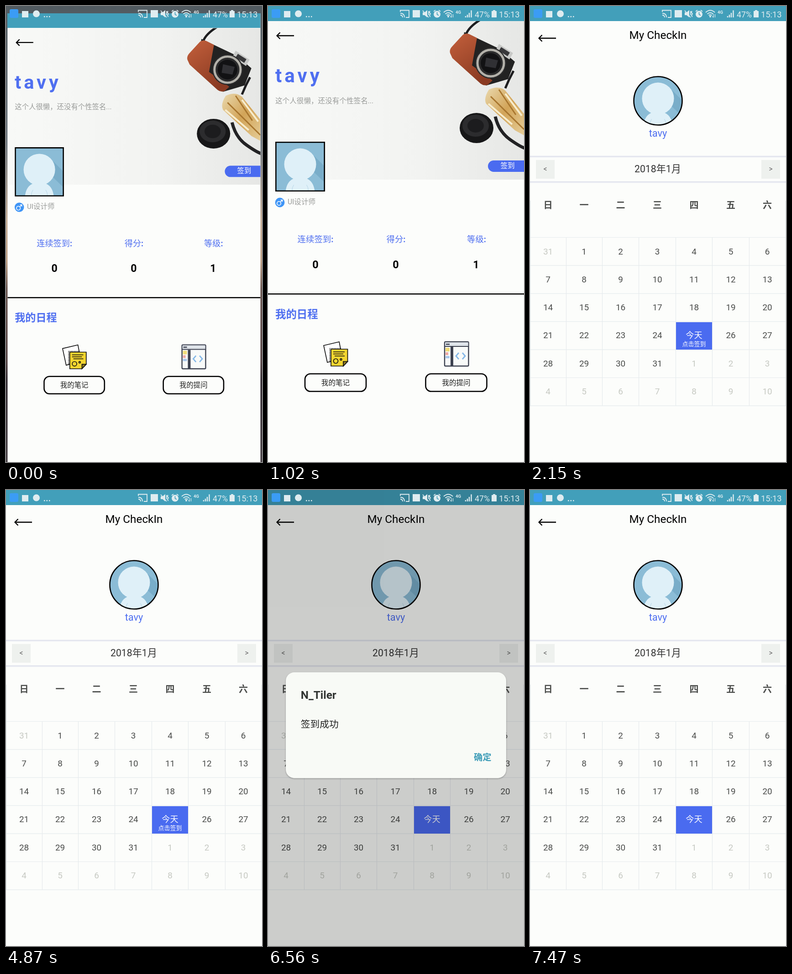
Recreate the animation shown at these times as an HTML page. Size 561 by 998 pixels, loop 8 s.

```html
<!DOCTYPE html>
<html lang="zh-CN">
<head>
<meta charset="utf-8">
<title>Check-in</title>
<style>
  html, body { margin: 0; width: 100%; height: 100%; overflow: hidden; background: #fcfdfb; }
  svg { display: block; width: 100%; height: 100%; }
  text { font-family: Roboto, "Noto Sans CJK SC", "Noto Sans CJK", sans-serif; }
  .mid { text-anchor: middle; }
  .bold { font-weight: 700; }
  .blue { fill: #4f6ff0; }
  .grey { fill: #999b99; }
  .s16 { font-size: 15.6px; }
  .s18 { font-size: 18.4px; }
  .s23 { font-size: 23.4px; }
  .line { fill: none; stroke: #000; stroke-width: 2.6; }
  .icon { fill: none; stroke: #dfecf0; stroke-width: 1.8; }
  .fillIcon { fill: #dfecf0; }
  .grid { fill: none; stroke: #e6ebed; stroke-width: 1.2; }

  #window, #checkin, #dim, #dialog, #hint { animation: 8s step-end infinite; }
  #window { animation-name: launch; transform-origin: 280.5px 499px; }
  #checkin { animation-name: enter; }
  #dim { animation-name: dim; }
  #dialog { animation-name: popup; transform-origin: 280.5px 515px; }
  #hint { animation-name: hint; }

  @keyframes launch {
    0% { transform: translateY(9.6px) scale(.9876); }
    1.37% { transform: translateY(5px) scale(.9935); }
    2.8% { transform: translateY(2.4px) scale(.997); }
    4.2% { transform: translateY(1px) scale(.9987); }
    5.6% { transform: translateY(.3px) scale(.9996); }
    7%, 100% { transform: none; }
  }
  @keyframes enter {
    0% { opacity: 0; transform: translateY(50px); }
    14.1% { opacity: .25; transform: translateY(30px); }
    15.5% { opacity: .6; transform: translateY(13px); }
    17% { opacity: .85; transform: translateY(4px); }
    18.35% { opacity: .96; transform: translateY(1px); }
    19.75%, 100% { opacity: 1; transform: none; }
  }
  @keyframes dim {
    0% { opacity: 0; }
    63.65% { opacity: .03; }
    65.05% { opacity: .09; }
    66.45% { opacity: .155; }
    67.85% { opacity: .205; }
    69.3% { opacity: .235; }
    70.75% { opacity: .25; }
    81.95% { opacity: .19; }
    83.5% { opacity: .12; }
    84.9% { opacity: .06; }
    86.3% { opacity: .02; }
    87.7%, 100% { opacity: 0; }
  }
  @keyframes popup {
    0% { opacity: 0; }
    65.05% { opacity: .6; transform: scale(.96); }
    66.45% { opacity: 1; transform: none; }
    81.95% { opacity: 1; transform: scale(.9915); }
    83.5% { opacity: .55; transform: scale(.965); }
    84.9% { opacity: .15; transform: scale(.94); }
    86.3%, 100% { opacity: 0; transform: none; }
  }
  @keyframes hint {
    0% { opacity: 1; }
    72.1%, 100% { opacity: 0; }
  }
</style>
</head>
<body>
<svg viewBox="0 0 561 998" preserveAspectRatio="none">
  <defs>
    <linearGradient id="wall" x2="0" y2="1">
      <stop offset="0" stop-color="#515a60"/>
      <stop offset=".3" stop-color="#727a82"/>
      <stop offset=".47" stop-color="#c9b29c"/>
      <stop offset=".56" stop-color="#c0a288"/>
      <stop offset=".62" stop-color="#6e5a55"/>
      <stop offset=".78" stop-color="#564546"/>
      <stop offset=".82" stop-color="#332c33"/>
      <stop offset="1" stop-color="#4a4348"/>
    </linearGradient>
    <linearGradient id="desk">
      <stop offset="0" stop-color="#f8f9f7"/>
      <stop offset=".6" stop-color="#f2f3f1"/>
      <stop offset="1" stop-color="#e6e7e5"/>
    </linearGradient>
    <linearGradient id="leather" x2=".6" y2="1">
      <stop offset="0" stop-color="#c4603c"/>
      <stop offset="1" stop-color="#8a3a22"/>
    </linearGradient>
    <linearGradient id="glass" x2="1" y2="1">
      <stop offset="0" stop-color="#ead9ae"/>
      <stop offset=".5" stop-color="#d2a458"/>
      <stop offset="1" stop-color="#e5cd98"/>
    </linearGradient>
    <filter id="shadow" x="-5%" y="-5%" width="110%" height="112%">
      <feDropShadow dx="0" dy="1.5" stdDeviation="1.5" flood-opacity=".3"/>
    </filter>
    <filter id="soft"><feGaussianBlur stdDeviation=".7"/></filter>
    <clipPath id="photoClip"><path d="M0 33H561V380H0Z"/></clipPath>
    <clipPath id="round"><circle r="53"/></clipPath>
    <pattern id="dots" width="2.4" height="2.4" patternUnits="userSpaceOnUse">
      <circle cx="1.2" cy="1.2" r=".8"/>
    </pattern>
    <g id="face">
      <path fill="#8bbcd6" d="M-53-53H53V53H-53Z"/>
      <path fill="#79adc9" d="M30-24 53-1V34L30 12Z"/>
      <path fill="#dff0f8" d="M-32 54Q-29 30-11 25H11Q29 30 32 54Z"/>
      <circle cy="-5" r="35" fill="#dff0f8"/>
      <path fill="none" stroke="#b5d5e5" d="M-18 54Q-18 45-14 40M18 54Q18 45 14 40"/>
    </g>
    <path id="back" fill="none" stroke="#000" stroke-width="2.3" d="M57 0H19M26.500-7 19.500 0 26.500 7"/>
  </defs>

  <path fill="url(#wall)" d="M0 0H561V998H0Z"/>

  <g id="window">
    <path fill="#fcfdfb" d="M0 0H561V998H0Z"/>

    <g id="profile">
      <g clip-path="url(#photoClip)">
        <path fill="url(#desk)" d="M0 33H561V380H0Z"/>
        <g filter="url(#soft)">
          <path fill="none" stroke="#1d1d1f" stroke-width="5" d="M434 62Q440 46 464 31M520 180Q528 160 538 142"/>
          <path fill="none" stroke="#222224" stroke-width="7" d="M498 242Q506 275 530 292T565 312"/>
          <path fill="#222" d="M430 57 510 95 541 122 526 160 478 174 420 128Z"/>
          <path fill="url(#leather)" d="M399 103Q397 95 404 88L427 63Q434 58 442 62L458 70 447 130 492 163 482 172Q474 176 466 170L404 114Z"/>
          <path fill="#c8c9c7" d="M506 83 537 103 529 117 499 97Z"/>
          <path fill="#38383a" d="M511 90 530 102 525 110 506 98Z"/>
          <circle cx="488" cy="125" r="34" fill="#2b2b2c"/>
          <circle cx="488" cy="125" r="29" fill="none" stroke="#b3b1aa" stroke-width="5"/>
          <circle cx="488" cy="125" r="22" fill="#121214"/>
          <path fill="#303034" d="M478 113 504 119 499 136 475 132Z"/>
          <path fill="url(#glass)" d="M484 183Q505 173 520 185L561 236V283L541 272 478 214Q472 202 484 183Z"/>
          <path fill="none" stroke="#a8762f" stroke-width="3" d="M488 198 561 270M506 183 543 238"/>
          <path fill="none" stroke="#f7eccc" stroke-width="4" d="M483 214 535 259M520 192 556 240"/>
          <ellipse cx="457" cy="267" rx="37" ry="33" fill="#171718"/>
          <ellipse cx="455" cy="262" rx="29" ry="24" fill="#2c2c2e"/>
          <ellipse cx="455" cy="262" rx="18" ry="15" fill="#1c1c1e"/>
        </g>
      </g>
      <use href="#back" y="65"/>
      <text class="blue bold" x="16" y="167" font-size="42" letter-spacing="6">tavy</text>
      <text class="grey s16" x="16" y="213">这个人很懒，还没有个性签名...</text>
      <path fill="#4a6bf0" d="M561 338H494.500a12.500 12.500 0 0 0 0 25H561Z"/>
      <text class="mid s16" x="525" y="355" fill="#fff">签到</text>

      <svg x="17" y="298" width="107" height="107" viewBox="-53.500 -53.500 107 107"><use href="#face"/></svg>
      <path class="line" d="M17.300 298.300H123.700V404.700H17.300Z"/>
      <circle cx="26" cy="430" r="10.400" fill="#3f95f6"/>
      <g fill="none" stroke="#fff" stroke-width="1.600">
        <circle cx="24" cy="432" r="4.300"/>
        <path d="M27 429 31.500 424.500M27.500 424.500H31.500V428.500"/>
      </g>
      <text class="grey s16" x="43" y="434">UI设计师</text>

      <g class="mid blue s18">
        <text x="104" y="517">连续签到<tspan class="bold">:</tspan></text>
        <text x="280.500" y="517">得分<tspan class="bold">:</tspan></text>
        <text x="457" y="517">等级<tspan class="bold">:</tspan></text>
      </g>
      <g class="mid bold s23">
        <text x="104" y="573.500">0</text>
        <text x="280" y="573.500">0</text>
        <text x="456" y="573.500">1</text>
      </g>
      <path class="line" d="M0 630.300H561"/>
      <text class="blue bold s23" x="16" y="683">我的日程</text>

      <g stroke="#111" stroke-width="1.700">
        <path fill="#fff" d="M122 743 156 735 163 771 130 780Z"/>
        <path stroke="none" fill="url(#dots)" d="M134 748H160V752H140V780H134Z"/>
        <path fill="#f3d52f" d="M139 751H174.500V778L165 788H138V752Z"/>
        <path fill="#8d7a22" d="M174.500 778H165V788Z"/>
        <path fill="none" stroke-width="1.500" d="M143 757H168M143 761.500H165M146 766H168"/>
        <circle cx="148.500" cy="777" r="5" fill="none"/>
        <circle cx="160" cy="773.500" r="1.800" fill="none"/>
      </g>
      <g filter="url(#soft)">
        <rect x="387" y="735" width="52.500" height="53" rx="2" fill="#f8faf9" stroke="#3c4150" stroke-width="2.400"/>
        <path fill="#dfe4ea" d="M388 736H438.500V744H388Z"/>
        <path fill="none" stroke="#3c4150" stroke-width="2" d="M387 745H439"/>
        <path fill="#3c4150" d="M400 746H406V788H400ZM390 739H398V741.500H390Z"/>
        <path fill="#f1dc7a" d="M389 748H398V756H389Z"/>
        <path fill="#eea7a3" d="M389 758H395V764H389Z"/>
        <path fill="#a9c8ec" d="M389 766H398V771H389Z"/>
        <path fill="none" stroke="#85b8e8" stroke-width="2.800" d="M418 759 412 766 418 773M426 759 432 766 426 773"/>
      </g>
      <rect class="line" x="81" y="805" width="134" height="38.500" rx="12"/>
      <rect class="line" x="345.500" y="805" width="134" height="38.500" rx="12"/>
      <g class="mid s16" fill="#222">
        <text x="148" y="829.500">我的笔记</text>
        <text x="412.500" y="829.500">我的提问</text>
      </g>
    </g>

    <g id="checkin">
      <path fill="#fcfdfb" d="M0 33H561V998H0Z"/>
      <use href="#back" y="70.500"/>
      <text class="mid" x="280.500" y="72" font-size="24.300">My CheckIn</text>
      <g transform="translate(280.500 207.500)">
        <use href="#face" clip-path="url(#round)"/>
        <circle class="line" r="53"/>
      </g>
      <text class="mid blue" x="280.500" y="285.500" font-size="21.800">tavy</text>
      <path fill="none" stroke="#f0f1f6" stroke-width="4" d="M0 329.500H561M0 385.500H561"/>
      <path fill="none" stroke="#dcdfe9" stroke-width="1.400" d="M0 329.500H561M0 385H561"/>
      <path fill="#eef1ee" d="M13 337H54V378H13ZM507 337H548V378H507Z"/>
      <g class="mid s16" fill="#666">
        <text x="33.500" y="362">&lt;</text>
        <text x="527.500" y="362">&gt;</text>
      </g>
      <text class="mid" x="280" y="364" font-size="21.200" fill="#333">2018年1月</text>
      <g id="calendar" class="mid"></g>
      <path fill="#4a6bf0" d="M320 692H399V752H320Z"/>
      <g class="mid" fill="#fff">
        <text x="359.500" y="727" font-size="18.200">今天</text>
        <text id="hint" x="359.500" y="744" font-size="13">点击签到</text>
      </g>
    </g>

    <path fill="#429fba" d="M0 0H561V33H0Z"/>
  </g>

  <path id="dim" d="M0 0H561V998H0Z"/>

  <g id="dialog">
    <rect x="37" y="398" width="487" height="233.500" rx="19" fill="#f8faf6" filter="url(#shadow)"/>
    <text class="bold" x="70" y="457" font-size="24.500" fill="#303331">N_Tiler</text>
    <text x="70" y="520.500" font-size="20.900" fill="#222">签到成功</text>
    <text class="mid bold" x="472" y="593" font-size="19.500" fill="#3f9db8">确定</text>
  </g>

  <g id="status">
    <rect x="8" y="7" width="19" height="19" rx="3" fill="#3b9cf5"/>
    <rect class="fillIcon" x="35" y="11" width="14" height="14"/>
    <circle class="fillIcon" cx="66.500" cy="17" r="7.500"/>
    <path class="fillIcon" d="M83 22h2.500v2.500H83ZM88.500 22h2.500v2.500h-2.500ZM94 22h2.500v2.500H94Z"/>
    <g class="icon">
      <path d="M290 13V9.500H309V25H302M290 16Q299 16 299 25M290 20Q295 20 295 25"/>
      <path d="M339 10 352 25M352 11V20M355 11 353.500 14 356 17 354 20 355.500 24"/>
      <path d="M363 12 367 9M378 12 374 9"/>
      <path d="M385 14Q395 5 405 14M388.500 17.500Q395 12 401.500 17.500M391.500 20.500Q395 18 398.500 20.500" stroke-width="2"/>
      <path d="M402 18V25M399.500 22.500 402 25M405.500 25V18" stroke-width="1.200"/>
      <path d="M433 25V22M437 25V19M441 25V15M445.500 25V9.500" stroke-width="2.400"/>
    </g>
    <g class="fillIcon">
      <rect x="317" y="9" width="16" height="16"/>
      <path d="M339 14H343L349 9V25L343 20H339Z"/>
      <circle cx="370.500" cy="18" r="7.500"/>
      <circle cx="395" cy="23" r="2"/>
      <path d="M493 9H498V11H501V25H490V11H493Z"/>
      <text x="411" y="16.500" font-size="9.500" class="bold">4G</text>
      <text x="453" y="24.500" font-size="17.800">47%</text>
      <text x="506" y="24.500" font-size="18.300">15:13</text>
    </g>
    <path fill="none" stroke="#429fba" stroke-width="1.600" d="M370.500 13.500V18.500L374 20.500"/>
  </g>
</svg>
<script>
  const calendar = document.getElementById('calendar');
  const colX = [39.5, 118.5, 198.5, 279, 359.5, 440, 520];
  const edgeX = [0.6, 79.5, 158.5, 238.5, 319.5, 399.5, 480.5, 560.4];
  const gridTop = 506.5, rowHeight = 61.4, monthDays = 31;

  function add(tag, attrs, label = '') {
    const el = document.createElementNS('http://www.w3.org/2000/svg', tag);
    for (const key in attrs) el.setAttribute(key, attrs[key]);
    el.textContent = label;
    calendar.append(el);
  }

  edgeX.forEach((x, i) => {
    const start = i % 7 ? gridTop : 426;
    add('path', { class: 'grid', d: `M${x} ${start}V${gridTop + 6 * rowHeight}` });
  });
  for (let row = 0; row <= 6; row++) {
    add('path', { class: 'grid', d: `M0 ${gridTop + row * rowHeight}H561` });
  }
  [...'日一二三四五六'].forEach((name, i) => {
    add('text', { x: colX[i], y: 443, class: 'bold', 'font-size': 20, fill: '#4a4c4a' }, name);
  });
  for (let i = 0; i < 42; i++) {
    if (i === 25) continue; // today has its own cell
    const inMonth = i > 0 && i <= monthDays;
    add('text', {
      x: colX[i % 7],
      y: 543.5 + Math.floor(i / 7) * 61.3,
      'font-size': 18.9,
      fill: inMonth ? '#4a4c4a' : '#c6c9c2'
    }, inMonth ? i : i ? i - monthDays : 31);
  }
</script>
</body>
</html>
```
